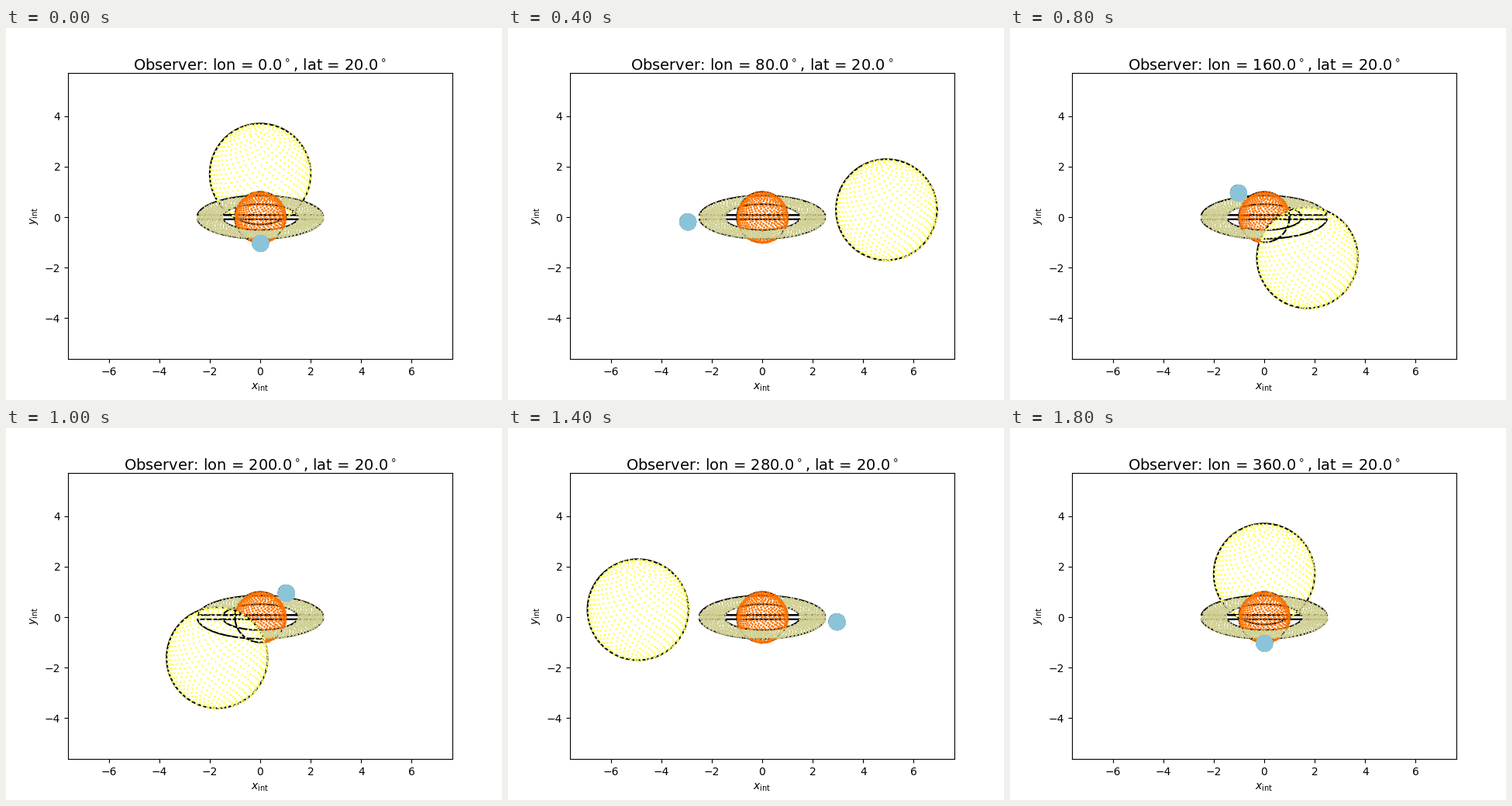
Write a matplotlib script that moves like this. It is 640x480 px and loops after 2000 ms.

```python
import numpy as np
import matplotlib.pyplot as plt
from matplotlib.animation import FuncAnimation

LAT = np.radians(20)
FRAMES, STEP_DEG, INTERVAL = 10, 40, 200
RING_IN, RING_OUT = 1.5, 2.5
COUNT = 1000
GOLDEN = np.pi * (3 - 5 ** 0.5)

# name: (radius, centre, colour)
SPHERES = {
    "star": (2.0, np.array([-5.0, 0, 0]), "#ffff66"),
    "planet": (1.0, np.zeros(3), "#ff7300"),
    "moon": (0.3, np.array([3.0, 0, 0]), "#8bc4d8"),
}
RING_COLOR = "#d0cf92"


def sphere_points(n):
    i = np.arange(n)
    z = (2 * i + 1) / n - 1
    r = np.sqrt(1 - z ** 2)
    phi = GOLDEN * (i + 1)
    return np.column_stack([r * np.cos(phi), r * np.sin(phi), z])


def ring_points(n):
    i = np.arange(n)
    r = np.sqrt(RING_IN ** 2 + (RING_OUT ** 2 - RING_IN ** 2) * (i + 0.5) / n)
    phi = GOLDEN * i
    return np.column_stack([r * np.cos(phi), r * np.sin(phi), 0 * r])


def view_axes(lon):
    """Right, up and towards-observer unit vectors as matrix columns."""
    c, s = np.cos(lon), np.sin(lon)
    cl, sl = np.cos(LAT), np.sin(LAT)
    return np.array([[-s, c, 0], [-sl * c, -sl * s, cl], [cl * c, cl * s, sl]]).T


def behind_sphere(seen, name, view):
    radius, centre, _ = SPHERES[name]
    x, y, depth = centre @ view
    inside = np.hypot(seen[:, 0] - x, seen[:, 1] - y) < radius
    return inside & (seen[:, 2] < depth)


def behind_ring(points, view):
    n = view[:, 2]
    t = -points[:, 2] / n[2]
    r = np.hypot(points[:, 0] + t * n[0], points[:, 1] + t * n[1])
    return (t > 0) & (r > RING_IN) & (r < RING_OUT)


def half_ellipse(radius, sign, gap=0.085):
    """Closed front or back half of the projected ring edge."""
    minor = radius * np.sin(LAT)
    start = np.arcsin(gap / minor)
    a = np.linspace(start, np.pi - start, 120)
    x, y = radius * np.cos(a), sign * minor * np.sin(a)
    return np.append(x, x[0]), np.append(y, y[0])


fig, ax = plt.subplots(figsize=(6.4, 4.8), dpi=100)
half_w = 1.1 * (5 * np.sin(np.radians(80)) + 2)
half_h = half_w * 369.6 / 496
mid_y = 2.5 * np.sin(LAT) * (1 - np.cos(np.radians(20)))
ax.set_xlim(-half_w, half_w)
ax.set_ylim(mid_y - half_h, mid_y + half_h)
ax.set_xlabel(r"$x_{\rm int}$")
ax.set_ylabel(r"$y_{\rm int}$")
title = ax.set_title("", fontsize=14, pad=2.5)

UNIT = sphere_points(COUNT)
RING = ring_points(COUNT)
ANGLE = np.linspace(0, 2 * np.pi, 200)

for edge in (RING_IN, RING_OUT):
    for sign in (1, -1):
        ax.plot(*half_ellipse(edge, sign), "k-", lw=1.5, zorder=1)

outlines = {name: ax.plot([], [], "k-", lw=1.5, zorder=1)[0] for name in SPHERES}
dots = {name: ax.scatter([], [], s=1, color=color)
        for name, (_, _, color) in SPHERES.items()}
dots["ring"] = ax.scatter([], [], s=1, color=RING_COLOR, zorder=3)
dots["planet"].set_zorder(4)
dots["moon"].set_zorder(6)


def update(i):
    lon = i * STEP_DEG
    view = view_axes(np.radians(lon))
    title.set_text(rf"Observer: lon = {lon:.1f}$^\circ$, lat = 20.0$^\circ$")

    for name, (radius, centre, _) in SPHERES.items():
        x, y, depth = centre @ view
        outlines[name].set_data(x + radius * np.cos(ANGLE), y + radius * np.sin(ANGLE))
        points = centre + radius * UNIT
        seen = points @ view
        shown = UNIT @ view[:, 2] > 0
        if name != "moon":
            shown &= ~behind_ring(points, view)
            for other in SPHERES:
                if other != name:
                    shown &= ~behind_sphere(seen, other, view)
        dots[name].set_offsets(seen[shown, :2])
        if name == "star":
            dots[name].set_zorder(5 if depth > 0 else 2)

    seen = RING @ view
    shown = np.ones(COUNT, bool)
    for name in SPHERES:
        shown &= ~behind_sphere(seen, name, view)
    dots["ring"].set_offsets(seen[shown, :2])
    return [title, *outlines.values(), *dots.values()]


anim = FuncAnimation(fig, update, frames=FRAMES, interval=INTERVAL,
                     repeat=True, repeat_delay=0, blit=False)
plt.show()
```
